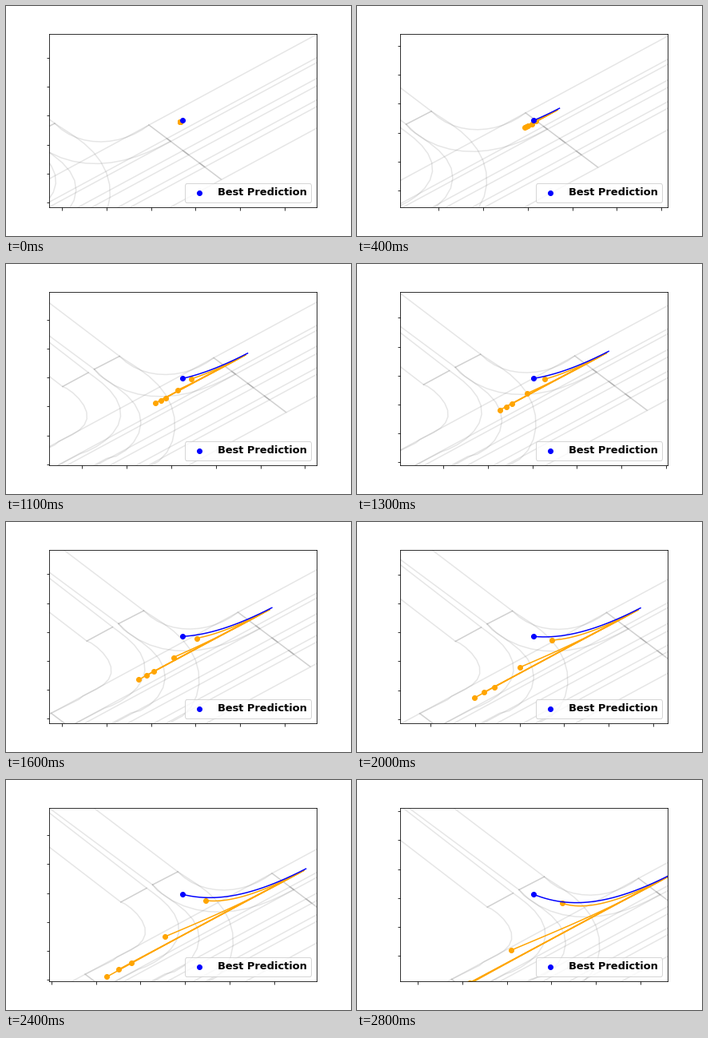
A matplotlib script for the animation above (2900 ms loop, 432 by 288 pixels).

```python
import numpy as np
import matplotlib.pyplot as plt
from matplotlib.animation import FuncAnimation

W, H, DPI = 432, 288, 72
FRAMES, STEP_MS = 29, 100
LEFT, RIGHT, TOP, BOTTOM = 54, 388.8, 34.56, 252
CENTER = complex(LEFT + RIGHT, TOP + BOTTOM) / 2
OTHERS_START = 218.5 + 145.5j


# Motion: positions are complex numbers (x + y*1j) in pixels.
def travel(speed, bend=0, bend2=0):
    """Displacement in every frame for a slowly changing velocity."""
    n = np.arange(FRAMES)
    return n * (speed + bend * n + bend2 * n ** 2)


best = CENTER - travel(8.45 - 4.37j, -0.1085 + 0.1455j, 0.001 - 0.0008j)
others = [OTHERS_START + move for move in (
    travel(-10.17 + 5.37j, -0.004 + 0.0073j),
    travel(-9.65 + 5.16j),
    travel(-9.15 + 4.92j, 0.0065 - 0.004j),
    travel(-8.055 + 4.6j, 0.0337 - 0.0645j, 0.0007j),
    travel(-7.12 + 3.8j, 0.095 - 0.104j, -0.00045 + 0.00045j),
)]

fig = plt.figure(figsize=(W / DPI, H / DPI), dpi=DPI, facecolor="white")
ax = fig.add_axes([LEFT / W, 1 - BOTTOM / H,
                   (RIGHT - LEFT) / W, (BOTTOM - TOP) / H])
ax.set_xticks(70 + 55.8 * np.arange(-6, 8), labels=[])
ax.set_yticks(65 + 36.24 * np.arange(-2, 9), labels=[])


# Map
def lane(*points):
    x, y = zip(*points)
    ax.plot(x, y, color="grey", alpha=0.2, lw=1.5, zorder=1)


def turn(*points):
    """Smooth curve through a few points."""
    p = np.array(points, float)
    dist = np.hypot(*np.diff(p, axis=0).T).cumsum()
    t = np.r_[0, dist / dist[-1]]
    coef = np.polyfit(t, p, len(p) - 1)
    return np.vander(np.linspace(0, 1, 13), len(p)) @ coef


def on_road(x, along):
    """Point on the main road: x on its stop line, then shifted along it."""
    return x + along, 149 + 0.753 * (x - 179) - 0.54 * along


# Main road: four overlapping lanes, each in three closed sections
for x in (179, 201.5, 221.6, 242.5):
    for near, far in ((-300, -234), (-234, 0), (0, 240)):
        a, b = on_road(x, near), on_road(x, far)
        c, d = on_road(x + 27.3, far), on_road(x + 27.3, near)
        lane(a, b, c, d, a)

# Side road: two lanes, with stop lines doubled by the crossing
corner, inner = (61, 147), (29.4, 163.3)
middle, outer = (22, 167.5), (-10.3, 185)
for a, b, ya, yb in ((corner, inner, 2, 45), (middle, outer, 50, 93)):
    lane((-130, ya), a, b, (-130, yb))
    lane(a, b)

# Turns between the roads
lane(*turn(corner, (97, 167.5), (135, 168.5), on_road(179, 0)))
lane(*turn(inner, (69, 190), (119, 197.3), (169, 186.5), on_road(206, 0)))
lane(*turn(corner, (112, 186), (130, 226), (125, 259), (96, 286)))
lane(*turn(inner, (68, 194), (87.7, 232), (76, 258), (45, 275)), (15, 291))
lane(*turn(middle, (50, 191), (62.5, 219), (45, 251), (12, 269)), (-30, 291))
lane(*turn(outer, (14, 205), (20, 226), (4, 244), (-20, 258)),
     on_road(179, -234))

# Predictions
trails = [ax.plot([], [], color="orange", lw=1.5, zorder=2)[0] for _ in others]
dots = ax.scatter([0] * len(others), [0] * len(others), s=36,
                  color="orange", zorder=2.5)
best_trail, = ax.plot([], [], color="blue", lw=1.5, zorder=3)
best_dot = ax.scatter([0], [0], s=36, color="blue", zorder=4,
                      label="Best Prediction")
ax.legend(loc="lower right",
          prop={"family": "DejaVu Sans", "size": 13, "weight": "bold"})


def show_path(line, path):
    line.set_data(path.real, path.imag)


def draw(n):
    for line, path in zip(trails, others):
        show_path(line, path[:n + 1])
    show_path(best_trail, best[:n + 1])
    dots.set_offsets([(path[n].real, path[n].imag) for path in others])
    best_dot.set_offsets([(best[n].real, best[n].imag)])

    # The view stays centred on the best prediction.
    shift = best[n] - CENTER
    ax.set_xlim(LEFT + shift.real, RIGHT + shift.real)
    ax.set_ylim(BOTTOM + shift.imag, TOP + shift.imag)
    return [*trails, dots, best_trail, best_dot]


anim = FuncAnimation(fig, draw, frames=FRAMES, interval=STEP_MS,
                     repeat=True, repeat_delay=0, blit=False)
plt.show()
```
